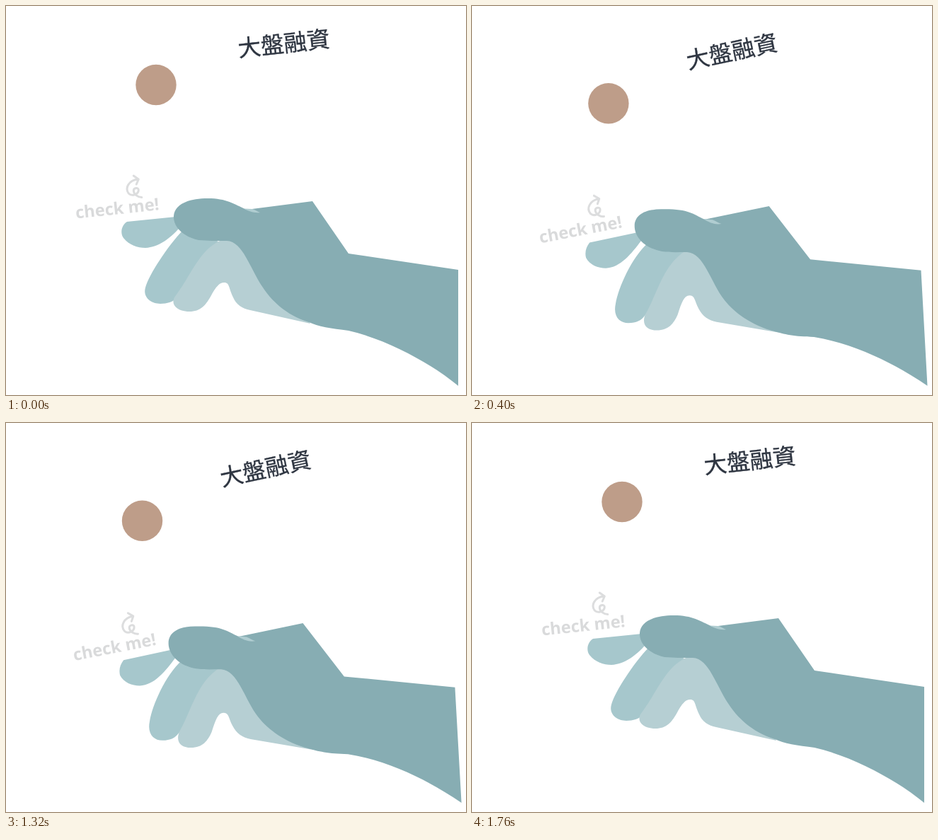
Animation, 650 px wide and 550 px high, one loop 5 s. Source, as an HTML page:

```html
<!DOCTYPE html>
<html lang="zh-Hant">
<head>
<meta charset="utf-8">
<style>
  html, body { margin: 0; width: 100%; height: 100%; overflow: hidden; background: #fff; }
  svg { display: block; width: 650px; height: 550px; }
  text { text-anchor: middle; }
  #title text { font: 500 32.6px "Noto Sans CJK TC", "Noto Sans CJK JP", "Noto Sans CJK", sans-serif; fill: #2e3541; stroke: #2e3541; stroke-width: .35; }
  #note text { font: 700 23.7px "Noto Sans", "Open Sans", sans-serif; fill: #d9dadb; }
  #note path { fill: none; stroke: #dcddde; stroke-width: 3; stroke-linecap: round; stroke-linejoin: round; }
</style>
</head>
<body>
<svg viewBox="0 0 650 550">
  <g id="note">
    <text y="6.4">check me!</text>
    <path transform="rotate(6) translate(-157 -288)"
      d="M191.5,270.5C186,270.5 180,266 180,261C180,257 187,256 187,260C187,266 178,270 173,265C167,257 174,246 186,245M180,240L187,245L184,252"/>
  </g>
  <g id="title"><text y="12">大盤融資</text></g>
  <circle id="ball" r="28.7" fill="#be9d89"/>
  <g id="hand"></g>
</svg>
<script>
const STEP = 40, LOOP = 5000;
const $ = id => document.getElementById(id);

// Each shape bends from the raised pose to the lowered one along a slight arc (bow).
const shapes = [
  { fill: '#a6c7cc', bow: [0, 0.5],
    up: 'M250,317C228,340 202,380 197,398C193,412 205,421 218,421C228,421 236,418 240,414L260,400L300,333L270,318Z',
    down: 'M248,341C225,360 208,405 205,428C201,448 210,457 222,457C234,457 240,453 245,446L262,425L300,352L270,345Z' },
  { fill: '#b6cfd3', bow: [1, 1.5],
    up: 'M300,333C272,348 262,380 238,412C232,424 244,432 259,432C275,432 282,423 289,411C297,396 302,391 308,391C316,391 314,397 321,412C325,422 334,428 345,430L430,449L390,380L330,320Z',
    down: 'M300,350C268,372 262,412 246,443C240,460 250,466 261,466C278,466 285,456 290,444C295,425 298,414 306,414C314,414 313,421 319,432C325,443 334,449 345,451L430,464L380,400L330,340Z' },
  { fill: '#a6c7cc', bow: [-2.5, -0.5],
    up: 'M240,298L171,305C163,310 161,321 166,328C174,338 186,342 197,342C216,341 232,328 245,314L260,300Z',
    down: 'M235,328L167,345C163,352 161,358 162,366C166,376 178,381 189,381C210,380 225,359 240,338L260,330Z' },
  { fill: '#87adb3', bow: [-0.7, 1.4],
    up: 'M433,276L484,350L639,373L639,537C600,505 540,472 484,459C460,456 440,453 428,447C395,437 374,415 363,398C345,372 335,333 312,332C298,332 285,332 272,331C250,326 236,312 237,297C238,280 258,272 285,272C312,272 322,280 340,288Z',
    down: 'M416,284L476,361L633,374L645,537C600,508 545,480 483,471C455,470 440,466 428,463C395,455 370,438 355,420C335,395 326,353 302,352C290,352 280,353 268,351C240,346 228,328 228,314C228,298 243,291 262,291C305,290 308,297 326,305Z' },
  { fill: '#b0cdd1', bow: [-0.7, 1.4],
    up: 'M337,286.5L348,287C352,288 356,291 359,292C350,293 343,290 337,287Z',
    down: 'M325,304.5L338,306C343,308 347,311 351,312C340,314 332,309 325,305Z' }
];

const POINT = /([\d.]+),([\d.]+)/g;
const points = d => [...d.matchAll(POINT)].map(m => [+m[1], +m[2]]);
const lerp = (a, b, p) => a + (b - a) * p;

function along(a, b, bow, p) {
  const arc = 4 * p * (1 - p);
  return [0, 1].map(i => (lerp(a[i], b[i], p) + bow[i] * arc).toFixed(2));
}

for (const s of shapes) {
  s.from = points(s.up);
  s.to = points(s.down);
  s.el = document.createElementNS('http://www.w3.org/2000/svg', 'path');
  s.el.setAttribute('fill', s.fill);
  $('hand').append(s.el);
}

function ease(u) {
  u = Math.min(1, Math.max(0, u));
  return lerp(u, u * u * (3 - 2 * u), 0.4);
}

// 0 = raised, 1 = lowered
const pose = t => t < 1120 ? ease(t / 560) : 1 - ease((t - 1155) / 605);

function place(id, a, b, bow, p, turnA = 0, turnB = 0) {
  $(id).setAttribute('transform',
    `translate(${along(a, b, bow, p)}) rotate(${lerp(turnA, turnB, p)})`);
}

function draw(p) {
  for (const s of shapes) {
    let i = 0;
    s.el.setAttribute('d', s.up.replace(POINT, () => {
      const a = s.from[i], b = s.to[i++];
      return along(a, b, a[0] > 470 ? [0, 0] : s.bow, p).join();
    }));
  }
  place('ball', [212, 111.5], [186.5, 146.5], [0, 0], p);
  place('title', [392.5, 53], [358.5, 66], [0, 2], p, -6.3, -14);
  place('note', [157.3, 288], [155.3, 329.5], [-3, -1.5], p, -6, -12.5);
}

const start = performance.now();
function tick() {
  const t = (performance.now() - start) % LOOP;
  draw(pose(Math.floor(t / STEP) * STEP));
  requestAnimationFrame(tick);
}
tick();
</script>
</body>
</html>
```
